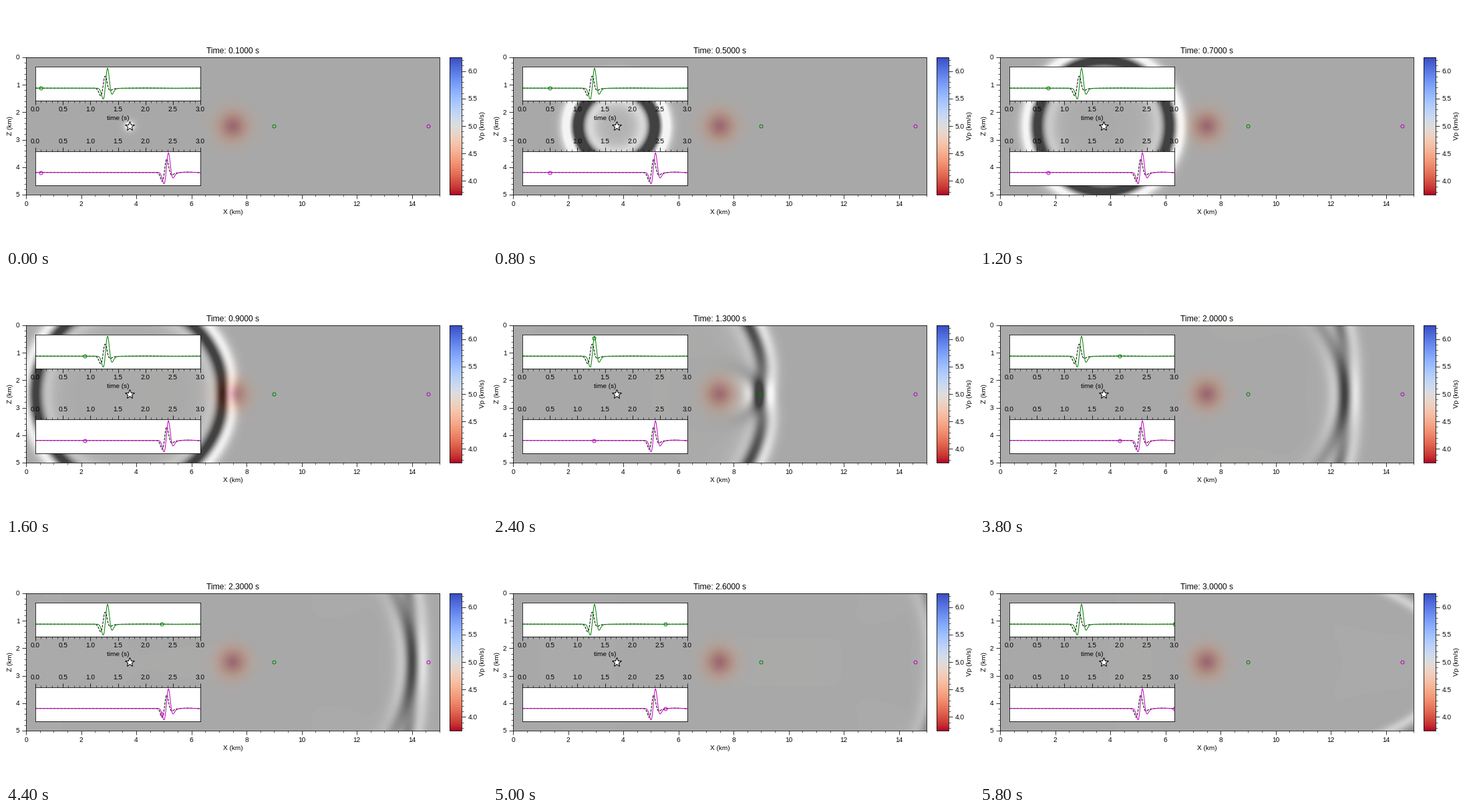
A matplotlib script for the animation above (6 s loop, 720x360 px).

```python
import numpy as np
import matplotlib.pyplot as plt
from matplotlib.animation import FuncAnimation
from matplotlib.cm import ScalarMappable
from matplotlib.colors import Normalize
from matplotlib.ticker import AutoMinorLocator, MultipleLocator

W, H = 720, 360
FRAMES, STEP = 30, 0.1             # frames, seconds of wave time per frame
DX, DT, PAD = 0.05, 0.004, 80      # km, s, sponge cells
NX, NZ = 301, 101
SRC, REC_A, REC_B = 3.75, 9.0, 14.6
MID = 2.5
F0 = 5.0                           # source peak frequency, Hz

plt.rcParams.update({
    "font.family": "Liberation Sans", "font.size": 10,
    "text.hinting": "native",
    "xtick.major.size": 6, "ytick.major.size": 6,
    "xtick.minor.size": 3, "ytick.minor.size": 3,
})

X, Z = np.meshgrid(np.arange(NX) * DX, np.arange(NZ) * DX)
VP = 5 - 1.25 * np.exp(-((X - 7.5) ** 2 + (Z - MID) ** 2) / (2 * 0.4 ** 2))


def ricker(t):
    a = (np.pi * F0 * (t - 1 / F0)) ** 2
    return (1 - 2 * a) * np.exp(-a)


def sponge(n):
    i = np.arange(n)
    depth = np.maximum(0, PAD - np.minimum(i, n - 1 - i)) / PAD
    return np.exp(-0.08 * depth ** 3)


def propagate(vp):
    """Acoustic wave equation: snapshots and the two receiver traces."""
    k = np.pad((vp * DT / DX) ** 2, PAD, mode="edge").astype(np.float32)
    nz, nx = k.shape
    damp = np.outer(sponge(nz), sponge(nx)).astype(np.float32)
    old, p, lap = (np.zeros((nz, nx), np.float32) for _ in range(3))
    row = PAD + round(MID / DX)
    cols = [PAD + round(x / DX) for x in (SRC, REC_A, REC_B)]
    per_frame = round(STEP / DT)
    snaps, traces = [], [[0, 0]]
    for n in range(FRAMES * per_frame):
        c = p[2:-2, 2:-2]
        near = p[1:-3, 2:-2] + p[3:-1, 2:-2] + p[2:-2, 1:-3] + p[2:-2, 3:-1]
        far = p[:-4, 2:-2] + p[4:, 2:-2] + p[2:-2, :-4] + p[2:-2, 4:]
        lap[2:-2, 2:-2] = (16 * near - far - 60 * c) / 12
        new = 2 * p - old + k * lap
        new[row, cols[0]] += ricker(n * DT)
        old, p = p * damp, new * damp
        traces.append([p[row, cols[1]], p[row, cols[2]]])
        if (n + 1) % per_frame == 0:
            snaps.append(p[PAD:-PAD, PAD:-PAD].copy())
    return snaps, np.array(traces)


snaps, traces = propagate(VP)
_, plain = propagate(np.full_like(VP, 5.0))
times = np.arange(len(traces)) * DT
level = plain[:, 0].max()


def echo(t):
    """Weak late arrivals in the two right-hand corners."""
    ramp = np.clip((t - 2.7) / 0.3, 0, 1) * np.clip(X - 13, 0, 1)
    out = 0
    for z0 in (7.5, -2.5):
        u = np.hypot(X - 10.5, Z - z0) - (8.33 + 5 * (t - 3))
        out = out - 0.4 * np.exp(-(u / 0.18) ** 2) \
            + 0.35 * np.exp(-((u - 0.45) / 0.2) ** 2)
    return level * ramp * out


def box(left, top, right, bottom):
    return [left / W, 1 - bottom / H, (right - left) / W, (bottom - top) / H]


def ring(ax, x, y, color):
    return ax.plot([x], [y], "o", ms=5, mfc="none", mec=color, mew=1)[0]


fig = plt.figure(figsize=(W / 72, H / 72), dpi=72, facecolor="white")
ax = fig.add_axes(box(30, 77, 649, 283))
h = DX / 2
extent = (-h, 15 + h, 5 + h, -h)
wave = ax.imshow(snaps[0], cmap="gray_r", vmin=-0.8 * level, vmax=1.1 * level,
                 extent=extent, aspect="auto", interpolation="bilinear")
norm = Normalize(3.75, 6.25)
ax.imshow(VP, cmap="coolwarm_r", norm=norm, alpha=0.3, extent=extent,
          aspect="auto", interpolation="bilinear")
ax.plot([SRC], [MID], "*", ms=15, mfc="white", mec="black", mew=1)
ring(ax, REC_A, MID, "g")
ring(ax, REC_B, MID, "m")
ax.set(xlim=(0, 15), ylim=(5, 0), xlabel="X (km)", ylabel="Z (km)")
ax.xaxis.set_major_locator(MultipleLocator(2))
ax.yaxis.set_major_locator(MultipleLocator(1))
ax.xaxis.set_minor_locator(AutoMinorLocator())
ax.yaxis.set_minor_locator(AutoMinorLocator())
title = ax.set_title("")

cax = fig.add_axes(box(664, 77, 682, 283))
bar = fig.colorbar(ScalarMappable(norm, "coolwarm_r"), cax=cax, label="Vp (km/s)")
bar.set_ticks(MultipleLocator(0.5))
cax.yaxis.set_minor_locator(AutoMinorLocator(5))


def trace_panel(rect, j, color):
    a = fig.add_axes(rect)
    a.plot(times, plain[:, j], "k--", lw=1)
    a.plot(times, traces[:, j], color=color, lw=1)
    a.set_xlim(0, 3)
    a.set_yticks([])
    a.xaxis.set_major_locator(MultipleLocator(0.5))
    a.xaxis.set_minor_locator(AutoMinorLocator(5))
    return a, ring(a, 0, 0, color)


top, dot_a = trace_panel(box(44, 91, 291, 142), 0, "g")
top.set_xlabel("time (s)")
low, dot_b = trace_panel(box(44, 218, 291, 269), 1, "m")
low.xaxis.tick_top()


def update(i):
    t = (i + 1) * STEP
    wave.set_data(snaps[i] + echo(t))
    n = round(t / DT)
    for j, dot in enumerate((dot_a, dot_b)):
        dot.set_data([t], [traces[n, j]])
    title.set_text(f"Time: {t:.4f} s")
    return wave, dot_a, dot_b, title


anim = FuncAnimation(fig, update, frames=FRAMES, interval=200, repeat=True,
                     repeat_delay=0, blit=False)
plt.show()
```
